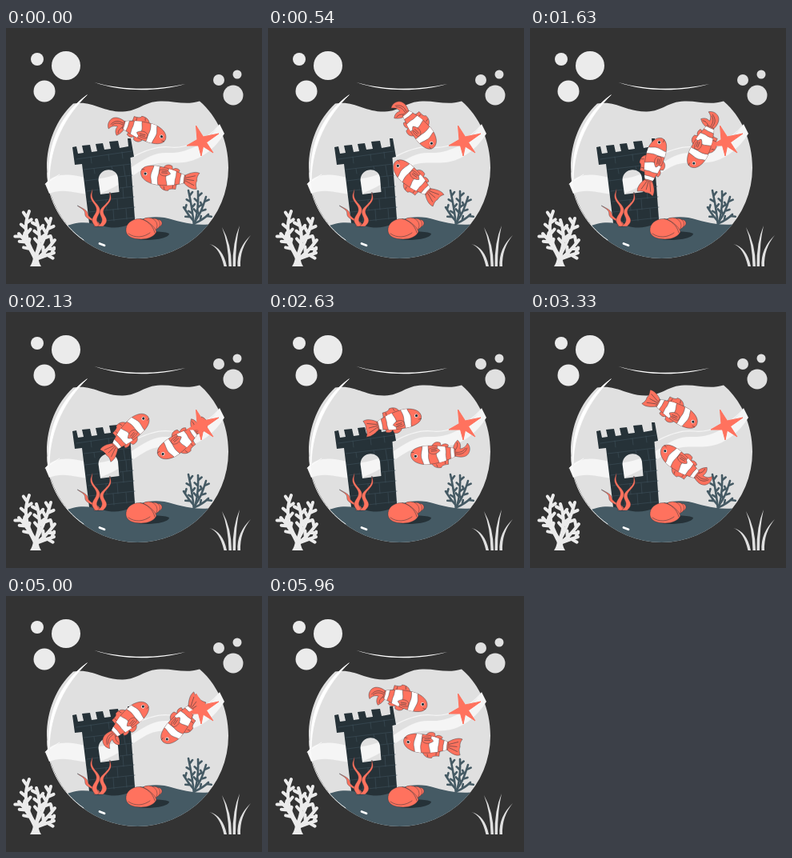
These frames come from a looping animation (320x320 px, 6 s). An HTML page:

```html
<!DOCTYPE html>
<html lang="en">
<head>
<meta charset="utf-8">
<title>Fish bowl</title>
<style>
  html, body { margin: 0; width: 100%; height: 100%; overflow: hidden; background: #333; }
  svg { display: block; width: 100vw; height: 100vh; }
  .line { fill: none; stroke-linecap: round; stroke-linejoin: round; }
  .ink { fill: none; stroke: #263238; stroke-width: .5; stroke-linecap: round; }
  .skin { fill: #ff725e; stroke: #263238; stroke-width: .4; stroke-linejoin: round; }
</style>
</head>
<body>
<svg viewBox="0 0 320 320">
  <defs>
    <clipPath id="bowl"><circle cx="164.5" cy="174.5" r="113.5"/></clipPath>
    <path id="trunk" d="M34 2C34 -5 28 -9 20 -11C10 -13 -8 -11 -22 -4.500V4.500C-10 9 2 11 12 11.500C22 12 33 10 34 2Z"/>
    <clipPath id="inside"><use href="#trunk"/></clipPath>
    <g id="body">
      <path class="skin" d="M9 -11C7 -16 2 -18 -3 -17C-3 -15 -6 -14 -12 -14C-12 -11 -12 -9 -13 -6Z"/>
      <path class="skin" d="M7 10C5 15 0 16 -4 14L-5 10C-8 13 -12 12 -14 10L-12 5Z"/>
      <use href="#trunk" class="skin"/>
      <g clip-path="url(#inside)" fill="#fff" stroke="#263238" stroke-width=".4">
        <path d="M19 -15C18 -8 22 -5 21 1C20 7 18 10 19 15H11C12 8 11 4 12 0C13 -6 11 -9 10 -15Z"/>
        <path d="M-1 -15C-1 -7 3 -4 2 1C1 6 -1 8 0 15H-11C-9 8 -11 4 -10 0C-9 -4 -11 -8 -9 -15Z"/>
        <path d="M-16 -10Q-15 0 -17 10H-21Q-20 0 -21 -10Z"/>
      </g>
      <path class="skin" d="M11 3C7 -1 1 0 -3 4C-1 8 6 10 11 7Z"/>
      <path class="ink" d="M8 4L1 4.500M8 6L2 6.500M2 -16L3 -13M-8 -13L-8 -10M33 5L30 5"/>
      <circle cx="28" cy="0" r="2.200" fill="#fff"/>
      <circle cx="28.200" cy="0" r="1.600" fill="#263238"/>
    </g>
  </defs>

  <rect width="320" height="320" fill="#333"/>
  <g id="bubbles"></g>

  <path fill="#e0e0e0" d="M84 94.500C108 90 120 105 146 104.500C166 104 172 92 193 91.500C211 91 224 97 242 91.500C264 110 278 141 278 174.500A113.500 113.500 0 0 1 51 174.500C51 143 63 114 84 94.500Z"/>
  <path fill="#f5f5f5" d="M49 195C60 181 80 182 98 187S142 184 160 172S188 155 203 156S248 150 267 120L273 132C262 150 243 166 222 168S190 165 172 176S140 198 120 206S78 197 54 207Z"/>
  <path class="line" stroke="#f5f5f5" stroke-width="1.200" d="M157 162C175 152 192 147 206 149S250 142 266 122"/>
  <g clip-path="url(#bowl)">
    <g id="weed" class="line" stroke="#455a64" stroke-width="2.600"></g>
    <path fill="#263238" fill-rule="evenodd" d="M83 149L88 148L90 157L97 156L95 147L105 146L107 155L114 154L112 145L121 144L123 152L131 151L129 142L140 141L142 150L153 148L152 138L156 138L160 161L155.500 162L162 252H105L95 170L86 171ZM118 208L115.500 190C116 174 138 173 140 187L141.500 205Z"/>
    <path class="line" stroke="#3b4d56" stroke-width=".7" d="M88 164L157 154M97 177L156 170M99 191L114 189M141 186L158 184M101 204L116 202M142 200L159 198M103 217L160 211M104 230L161 224M106 243L161 237M106 161L107 169M128 158L129 166M145 155L146 163M110 176L111 182M132 173L133 177M147 172L149 185M150 186L151 199M146 200L147 213M125 215L126 228M139 214L140 227M150 226L151 239M134 227L135 241M118 229L119 242"/>
    <path fill="#455a64" d="M70 250C90 240 105 243 120 247C133 251 143 250 153 246C165 240 178 234 198 237C216 241 230 248 260 245V295H70Z"/>
    <path fill="#263238" d="M158 262C173 252 198 254 204 257C204 264 172 268 158 262Z"/>
  </g>

  <g id="kelp" class="skin"></g>

  <g class="skin">
    <ellipse cx="190" cy="244" rx="5" ry="4.500"/>
    <ellipse cx="185" cy="245" rx="7.500" ry="7"/>
    <ellipse cx="178" cy="247" rx="11" ry="10"/>
    <path d="M150 254C149 244 158 238 168 238.500C174 239 187 248 188 255C185 261 177 264 169 264C159 264 151 261 150 254Z"/>
    <path class="ink" d="M153 257C161 263 172 262 180 256M168 238.500C176 240 184 247 186 256"/>
  </g>

  <g class="line" stroke="#fff">
    <path fill="#fff" stroke-width=".8" d="M101 84C72 104 50 144 54 190C55 146 74 110 101 84Z"/>
    <path stroke-width=".9" d="M52 181C51 213 69 246 97 265"/>
    <path stroke-width="2.800" d="M117 269.500L123 271.800"/>
    <path stroke-width=".7" d="M49 195C56 191 61 186 67 183"/>
  </g>
  <path fill="#fff" d="M110.500 68C145 78 188 78 224 70C188 80 145 80 110.500 68Z"/>

  <g id="coral" class="line" stroke="#ebebeb" stroke-width="4"></g>
  <path fill="#ebebeb" d="M30 298C34 292 34 287 34 282H41C40 289 41 293 44 298Z"/>
  <g id="grass" fill="#e0e0e0"></g>

  <g id="swim">
    <g transform="translate(167.500 127.500) rotate(17)">
      <path class="skin" d="M-20 -4C-26 -7 -34 -8 -38 -3C-41 1 -41 6 -38 10C-35 5 -32 4 -28 4C-30 8 -29 12 -26 15C-21 11 -20 7 -19 3Z"/>
      <path class="ink" d="M-23 -2C-29 -4 -34 -2 -37 4M-23 0C-28 -1 -32 0 -35 4M-22 3C-25 6 -26 9 -25 12"/>
      <use href="#body"/>
    </g>
    <g transform="translate(202 186) rotate(188)">
      <path class="skin" d="M-20 -4C-26 -9 -33 -12 -38 -10C-36 -5 -36 -2 -37 0C-36 4 -37 7 -39 10C-33 12 -26 8 -20 4Z"/>
      <path class="ink" d="M-23 -2L-34 -6M-23 0H-33M-23 2L-34 6"/>
      <use href="#body"/>
    </g>
  </g>

  <path fill="#ff725e" stroke="#ff725e" stroke-width="1" stroke-linejoin="round" d="M237.500 122L246.500 136L266 132L250.500 143L259 156L246.500 148L244 160L240.500 147L226 147L239 139.500Z"/>
</svg>

<script>
const LOOP = 6000, FRAMES = 144, PIVOT = '185 157';

function add(id, tag, attrs) {
  const el = document.createElementNS('http://www.w3.org/2000/svg', tag);
  for (const key in attrs) el.setAttribute(key, attrs[key]);
  document.getElementById(id).append(el);
}

const pen = points => 'M' + points.map(p => p.map(v => v.toFixed(2)).join(' ')).join('L');

// A curved stem with short twigs on alternate sides.
function frond(id, [x0, y0, cx, cy, x1, y1], twigs, size) {
  const mix = (a, b, c, t) => (1 - t) ** 2 * a + 2 * t * (1 - t) * b + t * t * c;
  const at = t => [mix(x0, cx, x1, t), mix(y0, cy, y1, t)];
  let d = `M${x0} ${y0}Q${cx} ${cy} ${x1} ${y1}`;
  for (let i = 0; i < twigs; i++) {
    const t = .35 + .5 * i / (twigs - 1);
    const [x, y] = at(t), [nx, ny] = at(t + .02);
    const a = Math.atan2(ny - y, nx - x) + (i % 2 ? .85 : -.85);
    d += pen([[x, y], [x + size * Math.cos(a), y + size * Math.sin(a)]]);
  }
  add(id, 'path', { d });
}

// A tapered blade that sways from foot to tip.
function kelp(x0, y0, x1, y1, sway) {
  const left = [], right = [];
  for (let i = 0; i <= 24; i++) {
    const t = i / 24, half = 3.4 * (1 - t) ** .7;
    const x = x0 + (x1 - x0) * t ** 1.3 + sway * Math.sin(t * 10) * (1 - t * .5);
    const y = y0 + (y1 - y0) * t;
    left.push([x - half, y]);
    right.unshift([x + half, y]);
  }
  add('kelp', 'path', { d: pen([...left, ...right]) + 'Z' });
}

[[39, 39, 8], [75, 47, 18], [48, 79, 13.5], [266, 65, 7], [289, 58, 5.5], [284, 84, 12.5]]
  .forEach(([cx, cy, r]) => add('bubbles', 'circle', { cx, cy, r, fill: cx < 160 ? '#ebebeb' : '#e0e0e0' }));

[
  [37, 290, 27, 268, 16, 257], [36, 284, 18, 256, 29, 229], [37, 284, 46, 264, 38, 240],
  [38, 284, 50, 262, 56, 238], [39, 288, 50, 280, 61, 265], [38, 289, 50, 284, 60, 281]
].forEach((stem, i) => frond('coral', stem, i < 4 ? 5 : 3, 8));

[
  [235, 247, 233, 226, 228, 203], [236, 244, 241, 226, 240, 204], [236, 242, 244, 232, 250, 211],
  [235, 242, 228, 234, 222, 224], [236, 244, 246, 240, 253, 233]
].forEach((stem, i) => frond('weed', stem, i < 3 ? 4 : 2, 6));

kelp(113, 248, 90, 222, 3);
kelp(115, 248, 107, 201, -4);
kelp(118, 248, 131, 205, 4);

// Each blade: foot x, bend point, tip point.
[
  [274, 268, 274, 254, 270], [280, 279, 270, 270, 249], [285, 284, 268, 292, 247],
  [291, 289, 276, 306, 259]
].forEach(([x, bx, by, tx, ty]) =>
  add('grass', 'path', { d: `M${x - 1.5} 298Q${bx - 1} ${by} ${tx} ${ty}Q${bx + 3} ${by} ${x + 2} 298Z` }));

const swim = document.getElementById('swim');
const start = performance.now();

function draw(now) {
  const t = Math.max(0, now - start) % LOOP;
  // 24 pictures a second, each starting on a 10 ms tick
  const step = Math.floor((Math.floor(t / 10) * 10 + 4.9) * FRAMES / LOOP);
  swim.setAttribute('transform', `rotate(${step * 360 / FRAMES} ${PIVOT})`);
  requestAnimationFrame(draw);
}
draw(start);
</script>
</body>
</html>
```
